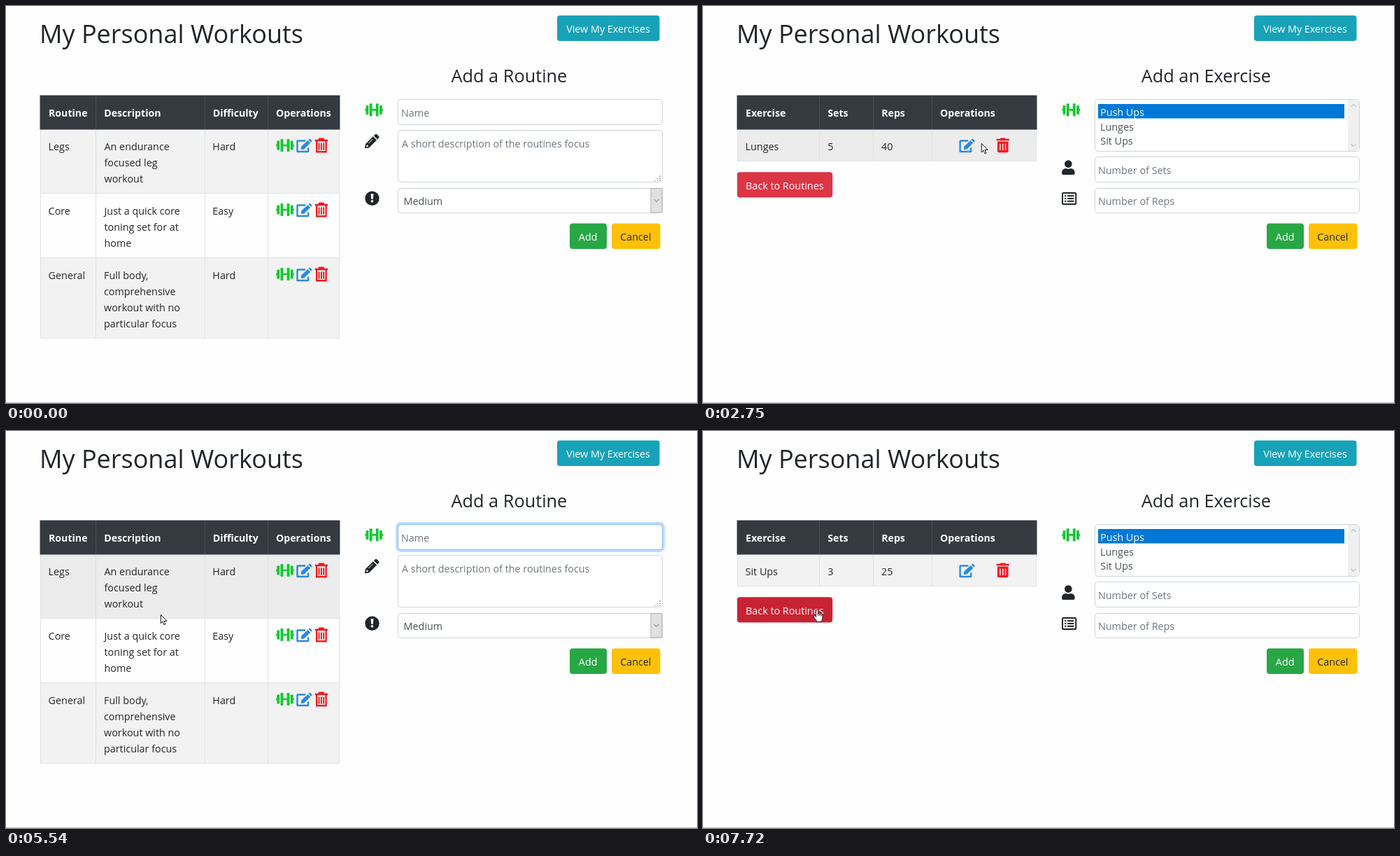
Recreate the animation shown at these times as an HTML page. Size 988 px wide and 567 px high, loop 8 s.

```html
<!DOCTYPE html>
<html lang="en">
<head>
<meta charset="utf-8">
<title>My Personal Workouts</title>
<style>
html, body { margin: 0; width: 100%; height: 100%; overflow: hidden; background: #fefefe; }
svg { display: block; font: 14.35px "Open Sans", "Noto Sans", sans-serif; fill: #212529; }
.h1 { font-size: 36px; }
.h2 { font-size: 25.3px; }
.mid { text-anchor: middle; }
.th { font-size: 14.15px; font-weight: 700; fill: #fff; }
.light { fill: #fff; }
.hint { fill: #6c757d; }
.value { fill: #495057; }
.head { fill: #343a40; }
.head-lines { fill: none; stroke: #454d55; }
.lines { fill: none; stroke: #dee2e6; }
.stripe { fill: #f2f2f2; }
.plain { fill: #fefefe; }
.box { fill: #fff; stroke: #ced4da; }
.icon { fill: currentColor; stroke: none; }
.green { color: #16c633; }
.blue { color: #2d89dc; }
.red { color: #f3191f; }
.dark { color: #212529; }
.chevron { fill: none; stroke: #606060; }

/* One percent of the loop is 80 ms. */
.anim { animation: 8s step-end infinite; }
.fade { animation: 8s linear infinite; }

#routines { animation-name: routines; }
#exercises { animation-name: exercises; }
@keyframes routines { 0%, 61.5% { opacity: 1 } 34.37%, 79.87% { opacity: 0 } }
@keyframes exercises { 0%, 61.5% { opacity: 0 } 34.37%, 79.87% { opacity: 1 } }

#first { animation-name: first; }
#second { animation-name: second; }
@keyframes first { 0% { opacity: 1 } 61.5% { opacity: 0 } }
@keyframes second { 0% { opacity: 0 } 61.5% { opacity: 1 } }

#legs { animation-name: legs; }
#core { animation-name: core; }
#entry { animation-name: entry; }
@keyframes legs {
  0%, 34.37%, 70.2% { fill: #f2f2f2 }
  23.7%, 61.5% { fill: #ececec }
}
@keyframes core { 0%, 79.87% { fill: #fefefe } 70.2% { fill: #ececec } }
@keyframes entry { 0%, 48.7% { fill: #f2f2f2 } 34.37% { fill: #ececec } }

#back { animation-name: back; }
#backGlow { animation-name: backGlow; }
@keyframes back {
  0%, 51.6%, 61.5%, 94.5% { fill: #dc3545 }
  53.4%, 61.49%, 96.3%, 100% { fill: #c82333 }
}
@keyframes backGlow { 0%, 61.5% { opacity: 0 } 60.5% { opacity: 1 } }

#focus { animation-name: focus; }
#caret { animation-name: caret; }
@keyframes focus {
  0%, 61.9%, 80.7%, 100% { opacity: 0 }
  63.8%, 78.87% { opacity: 1 }
}
@keyframes caret {
  0%, 68.7%, 78.87% { opacity: 0 }
  62%, 75.4% { opacity: 1 }
}

#pointer { animation: move 8s linear infinite; }
#arrow { animation-name: arrow; }
#hand { animation-name: hand; }
@keyframes move {
  0% { transform: translate(913px, 600px); animation-timing-function: step-end }
  .65% { transform: translate(913px, 590px); animation-timing-function: steps(5) }
  5.46% { transform: translate(720px, 400px); animation-timing-function: steps(6) }
  11.25% { transform: translate(546px, 256px); animation-timing-function: steps(6) }
  16.9% { transform: translate(440px, 60px); animation-timing-function: steps(5) }
  21.75% { transform: translate(446px, 146px); animation-timing-function: steps(2) }
  23.7% { transform: translate(389px, 178px); animation-timing-function: steps(5) }
  28.5% { transform: translate(398px, 196px) }
  45.91% { transform: translate(398px, 196px); animation-timing-function: steps(4) }
  49.75% { transform: translate(230px, 240px); animation-timing-function: steps(4) }
  53.6% { transform: translate(147px, 266px) }
  66.29% { transform: translate(147px, 266px); animation-timing-function: steps(3) }
  69.2% { transform: translate(221px, 262px); animation-timing-function: steps(8) }
  76.87% { transform: translate(402px, 294px) }
  88.66% { transform: translate(402px, 294px); animation-timing-function: steps(4) }
  92.5% { transform: translate(240px, 266px); animation-timing-function: steps(4) }
  96.45%, 100% { transform: translate(163px, 255px) }
}
@keyframes arrow {
  0%, 34.37%, 61.5%, 79.87% { opacity: 1 }
  25.5%, 51.6%, 75.8%, 94.5% { opacity: 0 }
}
@keyframes hand {
  0%, 34.37%, 61.5%, 79.87% { opacity: 0 }
  25.5%, 51.6%, 75.8%, 94.5% { opacity: 1 }
}
</style>
</head>
<body>
<svg width="988" height="567" viewBox="0 0 988 567">
  <defs>
    <!-- Icons are drawn on a 512-high grid. -->
    <g id="dumbbell" class="icon" transform="scale(.0406)">
      <path d="M0 224h40v64H0zM600 224h40v64h-40zM250 224h140v64H250z"/>
      <rect x="32" y="96" width="96" height="320" rx="24"/>
      <rect x="160" y="32" width="96" height="448" rx="24"/>
      <rect x="384" y="32" width="96" height="448" rx="24"/>
      <rect x="512" y="96" width="96" height="320" rx="24"/>
    </g>
    <g id="edit" class="icon" transform="scale(.0406)">
      <path d="M320 96H48q-16 0-16 16V464q0 16 16 16H400q16 0 16-16V340" fill="none" stroke="currentColor" stroke-width="60"/>
      <path d="M402 84 492 174 274 392 171 404Q160 405 161 394L173 292ZM425 61 448 36Q470 18 492 36L541 85Q559 107 541 129L514 151Z"/>
    </g>
    <g id="bin" class="icon" transform="scale(.0406)">
      <path d="M0 50H112L132 12Q138 0 150 0H298Q310 0 316 12L336 50H448V112H0Z"/>
      <path d="M58 100V484H390V100" fill="none" stroke="currentColor" stroke-width="56"/>
      <path d="M118 170h48v250h-48zM200 170h48v250h-48zM282 170h48v250h-48z"/>
    </g>
    <g id="trash" class="icon" transform="scale(.0406)">
      <path d="M0 32H120L140 8Q146 0 156 0H292Q302 0 308 8L328 32H448V96H0Z"/>
      <path d="M32 128H416V464Q416 512 368 512H80Q32 512 32 464ZM112 204V436H148V204ZM206 204V436H242V204ZM300 204V436H336V204Z" fill-rule="evenodd"/>
    </g>
    <g id="pencil" class="icon" transform="scale(.0406)">
      <path d="M292 92 420 220 150 490 26 511Q-2 512 1 484L22 362ZM316 68 362 22Q396-10 430 22L490 82Q522 116 490 150L444 196Z"/>
      <path d="M132 336 284 184" stroke="#fff" stroke-width="24"/>
      <path d="M58 400H112V454L70 462 50 442Z" fill="#fff"/>
    </g>
    <g id="ops">
      <use href="#dumbbell" x="386" class="green"/>
      <use href="#edit" x="415.2" class="blue"/>
      <use href="#bin" x="441.8" class="red"/>
    </g>
    <g id="actions">
      <rect x="806" y="310.5" width="53" height="36.5" rx="4" fill="#28a745"/>
      <text x="832.2" y="335" class="light mid">Add</text>
      <rect x="866" y="310.5" width="69.5" height="36.5" rx="4" fill="#ffc107"/>
      <text x="900.3" y="335" class="mid">Cancel</text>
      <use href="#dumbbell" x="513.2" y="138" class="green"/>
    </g>
  </defs>

  <rect width="988" height="567" fill="#fefefe"/>
  <rect y="566" width="988" height="1" fill="#c4c4c4"/>
  <text x="47.9" y="53" class="h1">My Personal Workouts</text>
  <rect x="788" y="13.5" width="146.5" height="36.5" rx="4" fill="#17a2b8"/>
  <text x="861" y="38" class="light mid">View My Exercises</text>

  <g id="routines" class="anim">
    <rect id="legs" class="anim stripe" x="49" y="176" width="428" height="91.5"/>
    <rect id="core" class="anim plain" x="49" y="267.5" width="428" height="92"/>
    <rect class="stripe" x="49" y="359.5" width="428" height="115"/>
    <path class="lines" d="M49.5 176V474.5H476.5V176M49 267.5H477M49 359.5H477M128.5 176V474M284.5 176V474M374.5 176V474"/>
    <rect class="head" x="48.5" y="127.5" width="429" height="49"/>
    <path class="head-lines" d="M128.5 128V176M284.5 128V176M374.5 128V176"/>
    <g class="th">
      <text x="61" y="158">Routine</text>
      <text x="140.2" y="158">Description</text>
      <text x="295.7" y="158">Difficulty</text>
      <text x="386" y="158">Operations</text>
    </g>
    <text x="60.6" y="206">Legs</text>
    <text y="206"><tspan x="140.5">An endurance</tspan><tspan x="140.5" dy="23">focused leg</tspan><tspan x="140.5" dy="23">workout</tspan></text>
    <text x="295.3" y="206">Hard</text>
    <text x="60.6" y="298">Core</text>
    <text y="298"><tspan x="140.5">Just a quick core</tspan><tspan x="140.5" dy="23">toning set for at</tspan><tspan x="140.5" dy="23">home</tspan></text>
    <text x="295.3" y="298">Easy</text>
    <text x="60.6" y="390">General</text>
    <text y="390"><tspan x="140">Full body,</tspan><tspan x="140" dy="23">comprehensive</tspan><tspan x="140" dy="23">workout with no</tspan><tspan x="140" dy="23">particular focus</tspan></text>
    <text x="295.3" y="390">Hard</text>
    <use href="#ops" y="188.6"/>
    <use href="#ops" y="280.6"/>
    <use href="#ops" y="372.6"/>

    <text x="719.4" y="109" class="h2 mid">Add a Routine</text>
    <use href="#actions"/>
    <use href="#pencil" x="513" y="182.5" class="dark"/>
    <circle cx="523.5" cy="274.7" r="10.2"/>
    <path d="M521.6 268.3h3.8l-.5 7.4h-2.8z" fill="#fff"/>
    <circle cx="523.5" cy="278.9" r="1.8" fill="#fff"/>

    <rect class="box" x="560.5" y="133.5" width="378" height="36" rx="4"/>
    <g id="focus" class="fade" fill="none">
      <rect x="558.6" y="131.6" width="381.8" height="39.8" rx="5.5" stroke="#007bff" stroke-opacity=".25" stroke-width="3"/>
      <rect x="560.5" y="133.5" width="378" height="36" rx="4" stroke="#80bdff"/>
    </g>
    <text x="565" y="158" class="hint">Name</text>
    <rect id="caret" class="anim" x="565" y="142" width="1" height="20" opacity="0" fill="#000"/>
    <rect class="box" x="560.5" y="177.5" width="378" height="74" rx="4"/>
    <text x="566" y="202" class="hint">A short description of the routines focus</text>
    <path d="M935 242v8M931.5 245.5v4.5M928 249v1" stroke="#b0b0b0" stroke-width="2" stroke-dasharray="2 1.4"/>
    <rect class="box" x="560.5" y="260.5" width="378" height="35" rx="4"/>
    <text x="568.6" y="284" class="value">Medium</text>
    <rect x="922" y="260.5" width="16" height="34.5" fill="#e1e1e1" stroke="#adadad"/>
    <path class="chevron" d="M926.5 276l3.5 3.5 3.5-3.5"/>
  </g>

  <g id="exercises" class="anim" opacity="0">
    <rect id="entry" class="anim stripe" x="49" y="176" width="428" height="46"/>
    <path class="lines" d="M49.5 176V221.5H476.5V176M166.5 176V221M243.5 176V221M327.5 176V221"/>
    <rect class="head" x="48.5" y="127.5" width="429" height="49"/>
    <path class="head-lines" d="M166.5 128V176M243.5 128V176M327.5 128V176"/>
    <g class="th">
      <text x="61" y="158">Exercise</text>
      <text x="178.3" y="158">Sets</text>
      <text x="255.2" y="158">Reps</text>
      <text x="339" y="158">Operations</text>
    </g>
    <g id="first" class="anim">
      <text x="60.6" y="206">Lunges</text>
      <text x="178.3" y="206">5</text>
      <text x="255" y="206">40</text>
    </g>
    <g id="second" class="anim">
      <text x="60.6" y="206">Sit Ups</text>
      <text x="178.3" y="206">3</text>
      <text x="255" y="206">25</text>
    </g>
    <use href="#edit" x="366.3" y="188.6" class="blue"/>
    <use href="#trash" x="419.6" y="188.4" class="red"/>

    <rect id="backGlow" class="anim" x="47.4" y="235.9" width="139.2" height="39" rx="5.5" fill="none" stroke="#dc3545" stroke-opacity=".5" stroke-width="3"/>
    <rect id="back" class="fade" x="48.8" y="237.3" width="136.4" height="36.2" rx="4" fill="#dc3545"/>
    <text x="116.8" y="262" class="light mid">Back to Routines</text>

    <text x="719.4" y="109" class="h2 mid">Add an Exercise</text>
    <use href="#actions"/>
    <circle cx="522.3" cy="225.6" r="5.3"/>
    <path d="M513 238.5q0-6.5 6-6.5 3.3 1.3 6.6 0 6 0 6 6.5v.5q0 2-2 2H515q-2 0-2-2z"/>
    <rect x="514" y="267" width="19.2" height="16" rx="1.5" fill="none" stroke="#212529" stroke-width="2"/>
    <path d="M517 271.2h2.4M517 275h2.4M517 278.8h2.4M521 271.2h9.4M521 275h9.4M521 278.8h9.4" stroke="#212529" stroke-width="1.9"/>

    <rect class="box" x="560.5" y="133.5" width="378" height="74" rx="4"/>
    <rect x="565" y="140" width="352" height="20.5" fill="#0078d7"/>
    <text x="568" y="157" class="light">Push Ups</text>
    <text x="568" y="178" class="value">Lunges</text>
    <text x="568.3" y="198" class="value">Sit Ups</text>
    <rect x="922" y="134" width="16" height="73" fill="#f0f0f0"/>
    <path class="chevron" style="stroke:#a0a0a0" d="M926.5 144l3.5-3.5 3.5 3.5M926.5 197l3.5 3.5 3.5-3.5"/>
    <rect class="box" x="560.5" y="215.5" width="378" height="36" rx="4"/>
    <text x="565" y="240" class="hint">Number of Sets</text>
    <rect class="box" x="560.5" y="260.5" width="378" height="35" rx="4"/>
    <text x="565" y="284" class="hint">Number of Reps</text>
  </g>

  <g id="pointer" fill="#fff" stroke="#111" stroke-linejoin="round">
    <path id="arrow" class="anim" d="M.3.3V12.8L3 10.2 5 14.8 7 13.9 5.1 9.5H9Z"/>
    <path id="hand" class="anim" opacity="0" d="M-1.4 10.5V1.6Q-1.3.4 0 .4T1.4 1.6V6Q2.6 5.2 3.9 6.4 5.2 5.6 6.2 7 8 6.6 8 8.6V12Q8 14 6.8 15.5V17.5H-.6V16Q-3 13.5-4.6 10.6-5 9.2-3.7 8.8-2.6 8.8-1.4 10.5ZM1.4 6V9M3.9 6.4V9.2M6.2 7V9.4" stroke-width=".9"/>
  </g>
</svg>
</body>
</html>
```
